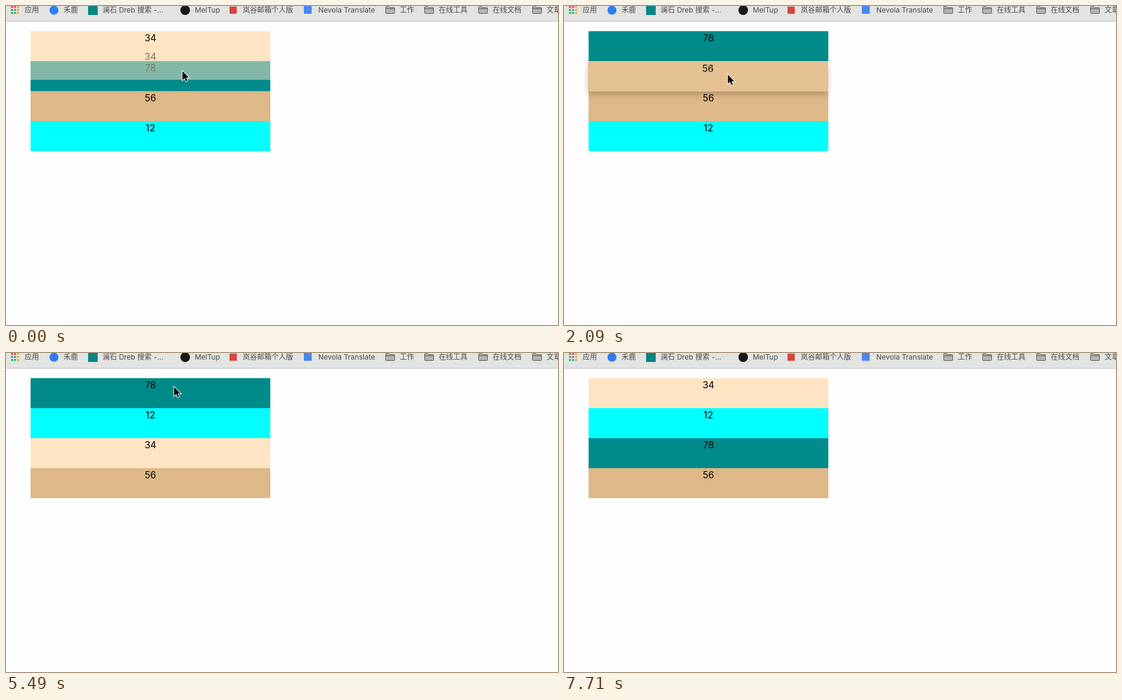
Write an HTML page that moves like this. It is 921 by 532 pixels and loops after 9040 ms.

```html
<!DOCTYPE html>
<html lang="zh">
<head>
<meta charset="utf-8">
<style>
html, body { margin: 0; width: 100%; height: 100%; overflow: hidden; background: #fefefe; }
svg { display: block; width: 921px; height: 532px; font-family: Inter, "Noto Sans CJK SC", "Noto Sans CJK", sans-serif; }
.bar text { font-size: 12px; fill: #4a4b4a; }
.row text { font-size: 15.5px; text-anchor: middle; }
</style>
</head>
<body>
<svg id="stage" viewBox="0 0 921 532">
  <defs>
    <filter id="blur" x="-10%" y="-60%" width="120%" height="220%"><feGaussianBlur stdDeviation="5.5"/></filter>
    <clipPath id="outside"><path clip-rule="evenodd" d="M-40-40H440V100H-40ZM0 0H400V50H0Z"/></clipPath>
  </defs>
  <rect width="921" height="532" fill="#fefefe"/>
  <g class="bar" id="bar">
    <rect width="921" height="25" fill="#e2e4e2"/>
    <rect y="25" width="921" height="1" fill="#bcbdbc"/>
    <circle cx="80" cy="7" r="7.5" fill="#2f7df0"/>
    <rect x="137" y="-1" width="16" height="16" fill="#0a8484"/>
    <circle cx="299" cy="7" r="8" fill="#191717"/>
    <rect x="373" y="1" width="12" height="12" fill="#d8453a"/>
    <rect x="497" y="0" width="13" height="13" fill="#4a86f0"/>
  </g>
  <g id="rows"></g>
  <g id="ghost">
    <g clip-path="url(#outside)"><rect id="shadow" y="4" width="400" height="50" filter="url(#blur)"/></g>
  </g>
  <path id="cursor" d="M0 0V15L3.5 11.8L5.8 17.2L8.2 16.2L5.9 11H10.6Z" stroke="#fff" stroke-width="2" paint-order="stroke"/>
</svg>
<script>
const NS = 'http://www.w3.org/2000/svg';
const $ = id => document.getElementById(id);

function add(parent, tag, attrs, text) {
  const el = document.createElementNS(NS, tag);
  for (const k in attrs) el.setAttribute(k, attrs[k]);
  if (text) el.textContent = text;
  parent.appendChild(el);
  return el;
}
const move = (el, x, y) => el.setAttribute('transform', `translate(${x} ${y})`);
const show = (el, on) => { el.style.display = on ? '' : 'none'; };

// Smooth step from 0 to 1, held outside
function ease(u) {
  u = Math.max(0, Math.min(1, u));
  return u * u * (3 - 2 * u);
}

// Bookmark bar
const labels = {
  31: '应用', 96: '禾鹿', 161: '澜石 Dreb 搜索 -...', 315: 'MelTup', 395: '岚谷邮箱个人版',
  521: 'Nevola Translate', 657: '工作', 722: '在线工具', 812: '在线文档', 902: '文章'
};
for (const x in labels) {
  add($('bar'), 'text', { x, y: 11 }, labels[x]);
  if (x > 650) folder(x - 24);
}

function folder(x) {
  const g = add($('bar'), 'g', { fill: '#b3b4b3', stroke: '#565756' });
  move(g, x, 0);
  add(g, 'path', { d: 'M.5 11V2Q.5 1 1.5 1H5.5L7 2.5H14.5Q15.5 2.5 15.5 3.5V11.5Q15.5 12.5 14.5 12.5H1.5Q.5 12.5 .5 11Z' });
  add(g, 'path', { d: 'M.5 4.5H15.5' });
}

const dots = { r: '#e8453c', y: '#f5a623', g: '#34a853', b: '#4285f4' };
[...'rrygbyggy'].forEach((c, i) => add($('bar'), 'rect', {
  x: 8.5 + i % 3 * 5, y: Math.floor(i / 3) * 5, width: 3.2, height: 3.2, fill: dots[c]
}));

// Sortable rows
const colors = { 34: '#ffe4c4', 78: '#008b8b', 56: '#deb887', 12: '#00ffff' };
const LEFT = 41, TOP = 42, H = 50;

function makeRow(parent, n) {
  const g = add(parent, 'g', { class: 'row' });
  add(g, 'rect', { width: 400, height: H, fill: colors[n] });
  add(g, 'text', { x: 200, y: 17.2 }, n);
  return g;
}
const rows = {}, ghosts = {};
for (const n in colors) {
  rows[n] = makeRow($('rows'), n);
  ghosts[n] = makeRow($('ghost'), n);
}

// Each drag swaps two rows when it ends; x, y is where the row was pressed
const drags = [
  { start: 0, end: 4, from: 0, to: 1, x: 294, y: 77 },
  { start: 11, end: 15, from: 2, to: 1, x: 274, y: 163 },
  { start: 21, end: 25, from: 3, to: 1, x: 268, y: 217 },
  { start: 39, end: 46, from: 0, to: 2, x: 281.5, y: 62.5 }
];

// Pointer trips: start tick, end tick, destination
const trips = [
  [0, 3, 297, 118],
  [6, 9, 274, 171],
  [10, 12.4, 273, 114],
  [14, 18, 270, 231],
  [18, 23.4, 269, 123],
  [26, 29, 267, 112],
  [36, 37, 280, 56],
  [38, 41, 290, 183],
  [42, 44, 288, 175],
  [47, 51, 790, 512]
];

function pointer(k) {
  let x = 294, y = 108;
  for (const [start, end, toX, toY] of trips) {
    const u = ease((k - start) / (end - start));
    x += (toX - x) * u;
    y += (toY - y) * u;
  }
  return { x, y };
}

const LOOP = 9040, TICKS = 61, EXIT = 52;

function draw(t) {
  // The screen refreshes in coarse ticks, each held still
  const k = Math.min(TICKS - 1, Math.floor((t + 9) / LOOP * TICKS));
  const order = [34, 78, 56, 12];
  for (const { end, from, to } of drags) {
    if (k >= end) [order[from], order[to]] = [order[to], order[from]];
  }
  order.forEach((n, i) => move(rows[n], LEFT, TOP + i * H));

  const at = pointer(k);
  show($('cursor'), k < EXIT);
  move($('cursor'), at.x + .5, at.y + .5);

  const drag = drags.find(d => k >= d.start && k < d.end);
  show($('ghost'), drag);
  if (drag) {
    const dx = at.x - drag.x, dy = at.y - drag.y;
    const alpha = .8 * ease(Math.abs(dy) / 52);
    move($('ghost'), LEFT + dx, TOP + drag.from * H + dy);
    $('ghost').setAttribute('opacity', alpha);
    $('shadow').setAttribute('opacity', Math.max(0, alpha - .5));
    for (const n in ghosts) show(ghosts[n], +n === order[drag.from]);
  }
}

const begin = performance.now();
function loop() {
  draw((performance.now() - begin) % LOOP);
  requestAnimationFrame(loop);
}
loop();
</script>
</body>
</html>
```
